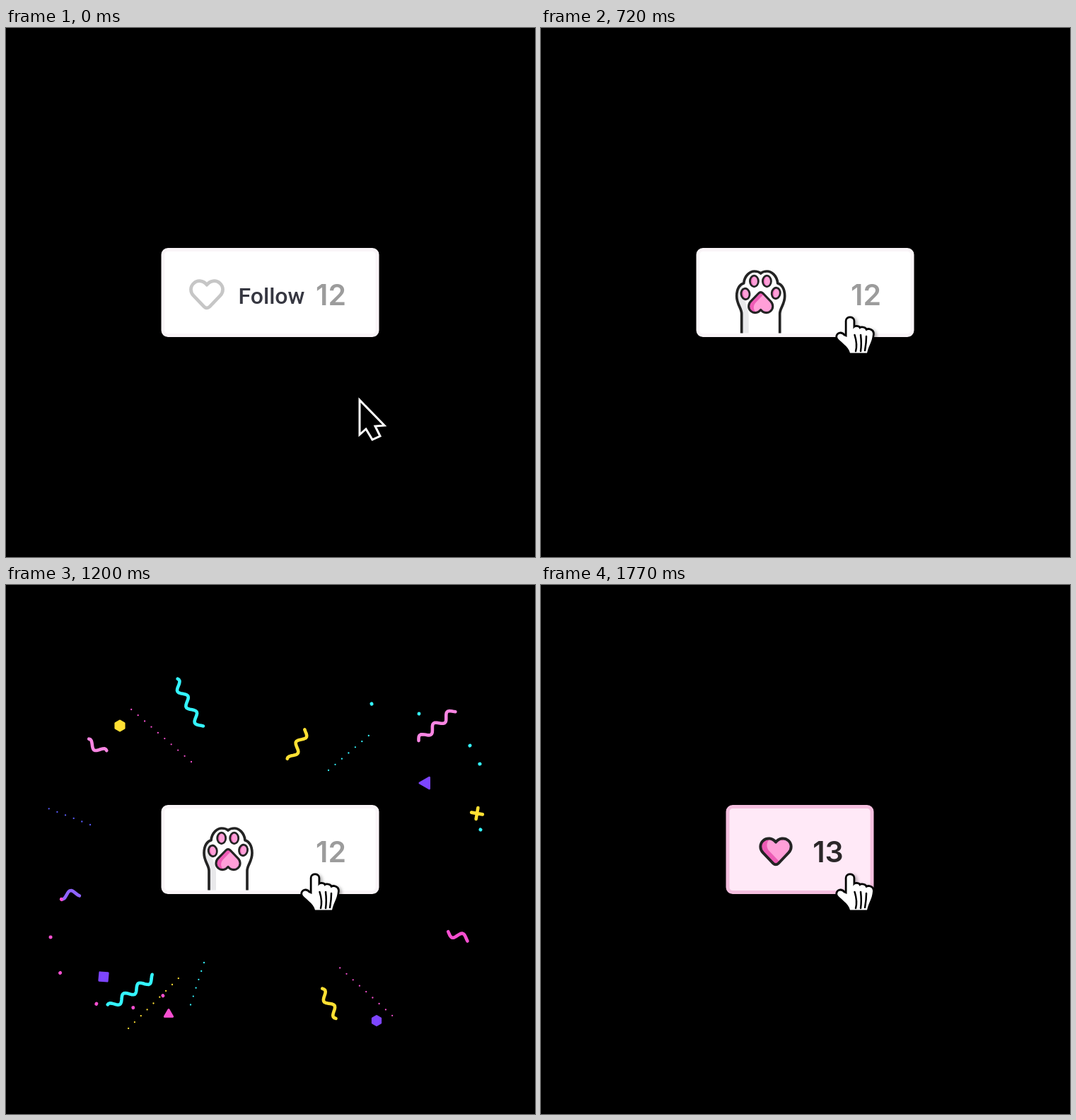
An HTML page that plays this animation: 748x748 px, repeating every 3.57 s.

```html
<!DOCTYPE html>
<html lang="en">
<head>
<meta charset="utf-8">
<title>Follow button</title>
<style>
  html, body { margin: 0; width: 100%; height: 100%; overflow: hidden; background: #000; }
  svg { display: block; width: 100vw; height: 100vh; }
  path { stroke-linecap: round; stroke-linejoin: round; }
  .num { font: 600 41px Inter, Roboto, sans-serif; text-anchor: middle; }
  .label { font: 500 32px Roboto, sans-serif; fill: #363741; }
  .ink { fill: none; stroke: #242424; stroke-width: 3.7; }
  .hand { filter: drop-shadow(3px 2px 2px rgba(0, 0, 0, .3)); }
</style>
</head>
<body>
<svg viewBox="0 0 748 748">
  <defs>
    <path id="heart" d="M0-6.4C-2-9.3-6-9.8-8.5-7.6C-11.2-5.2-11-1.6-8.7 .8L-1.8 8C-.7 9.1 .7 9.1 1.8 8L8.7 .8C11-1.6 11.2-5.2 8.5-7.6C6-9.8 2-9.3 0-6.4Z"/>
    <path id="arm" d="M-27 100V62C-27 54-34 49-34 37C-34 26-29 20-24 19C-23 8-15 2-9 2C-5 2-2 3 0 5C2 3 5 2 9 2C15 2 23 8 24 19C29 20 34 26 34 37C34 49 27 54 27 62V100"/>
    <clipPath id="heartClip"><use href="#heart"/></clipPath>
    <clipPath id="armClip"><use href="#arm"/></clipPath>
    <clipPath id="padClip"><ellipse rx="6" ry="7.8"/></clipPath>
    <clipPath id="inner"><rect x="220" y="311" width="308" height="120.5"/></clipPath>
    <g id="pinkHeart">
      <use href="#heart" fill="#ee5cb6"/>
      <g clip-path="url(#heartClip)"><use href="#heart" x="4.4" y="-1" fill="#ff9fd8"/></g>
      <use href="#heart" fill="none" stroke="#242424" stroke-width="1.9"/>
    </g>
    <g id="pad">
      <ellipse rx="6" ry="7.8" fill="#ee6cba"/>
      <g clip-path="url(#padClip)"><ellipse cx="3" rx="6" ry="8.5" fill="#ff9fd8"/></g>
      <ellipse rx="6" ry="7.8" fill="none" stroke="#242424" stroke-width="2.8"/>
    </g>
  </defs>

  <g id="confetti" fill="none"></g>

  <rect id="button" y="313.5" height="121" rx="7" stroke-width="5"/>
  <text id="label" class="label" x="328.5" y="390">Follow</text>
  <use id="outline" href="#heart" fill="none" stroke="#c6c6c6" stroke-width="2.2"/>
  <text id="before" class="num" y="392" fill="#9c9c9c">12</text>
  <text id="after" class="num" y="391.5" fill="#2b2729">13</text>

  <g clip-path="url(#inner)">
    <g id="white">
      <use href="#arm" fill="#fff"/>
      <path d="M-27 100H-17V64C-17 54-24 46-26 20H-40V100Z" fill="#e9e9eb" clip-path="url(#armClip)"/>
      <use href="#arm" class="ink"/>
      <use href="#pad" transform="translate(-21.7 34) rotate(-8)"/>
      <use href="#pad" transform="translate(-9.3 16)"/>
      <use href="#pad" transform="translate(8.7 16)"/>
      <use href="#pad" transform="translate(21.5 33) rotate(8)"/>
      <use href="#pinkHeart" transform="translate(0 46) scale(1.63 -1.63)"/>
    </g>
    <g id="yellow">
      <use href="#arm" fill="#ffeea4"/>
      <path d="M-40 100H-17V64C-17 48-24 34-10 0H-40Z" fill="#ffd45e" clip-path="url(#armClip)"/>
      <use href="#arm" class="ink"/>
      <path class="ink" d="M-24 19l4 5M0 5v5M24 19l-4 5" style="stroke-width:3"/>
    </g>
    <g id="impact" fill="none">
      <circle id="ring" cx="341" cy="377" stroke="#ee4fcb"/>
      <path id="ticks" stroke="#000" stroke-width="4.5" style="stroke-linecap:butt"/>
    </g>
  </g>
  <use id="liked" href="#pinkHeart"/>

  <path id="arrow" d="M0 0V49L9 41L18 56L29 51L22 37L35 36Z" fill="#000" stroke="#fff" stroke-width="3" style="stroke-linejoin:miter"/>
  <g id="hand" class="hand">
    <path d="M432.5 437V414C432.5 409 441.5 409 441.5 414V426C443 421.5 450 422 450.5 426C452 423 459 424 459.5 428.5C462 425.5 469.5 427 469 433C468 445 464 447 461 459.5H437C435 450 422 443 419.5 438.5C417.5 433 424 430 428 435Z" fill="#fff" stroke="#000" stroke-width="5.5" paint-order="stroke"/>
    <path d="M443.5 434C446 442 447 450 445 457M452 434C453 442 453 450 452 457M460 436C460 445 459 450 458 456" fill="none" stroke="#000" stroke-width="2.5"/>
  </g>
</svg>
<script>
const LOOP = 3570, STEP = 30, END = 1770;
const CYAN = '#34f5ff', YELLOW = '#ffe033', PINK = '#f985e2', MAGENTA = '#f64fd0', PURPLE = '#7d45ff', BLUE = '#5a5cff';

const $ = id => document.getElementById(id);
const clamp = x => Math.max(0, Math.min(1, x));
const span = (t, a, b) => clamp((t - a) / (b - a));
const smooth = x => x * x * (3 - 2 * x);
const lerp = (a, b, p) => a + (b - a) * p;
const mix = (a, b, p) => `rgb(${a.map((v, i) => Math.round(lerp(v, b[i], p)))})`;
const put = (el, attrs) => { for (const k in attrs) el.setAttribute(k, attrs[k]); };
const place = (id, x, y, s = 1) => put($(id), { transform: `translate(${x} ${y}) scale(${s})` });
const show = (id, v) => put($(id), { opacity: v });

// Piecewise linear track: [[time, value], ...]
function track(keys, t) {
  if (t <= keys[0][0]) return keys[0][1];
  for (let i = 1; i < keys.length; i++) {
    const [t0, v0] = keys[i - 1], [t1, v1] = keys[i];
    if (t <= t1) return lerp(v0, v1, (t - t0) / (t1 - t0));
  }
  return keys[keys.length - 1][1];
}

function addPath(attrs) {
  const el = document.createElementNS('http://www.w3.org/2000/svg', 'path');
  put(el, attrs);
  $('confetti').append(el);
  return el;
}

// x0, y0, x1, y1, delay, colour, phase in turns
const waves = [
  [300, 245, 211, 83, 0, CYAN, .42],
  [252, 525, 98, 630, 0, CYAN, .3],
  [386, 278, 442, 172, 0, YELLOW, .36],
  [428, 545, 488, 642, 0, YELLOW, .34],
  [553, 246, 688, 131, 30, PINK, .93],
  [152, 245, 70, 193, 80, PINK, .6],
  [107, 434, 2, 454, 150, '#8f63ff', .65],
  [619, 490, 734, 524, 135, MAGENTA, .71]
];
const dots = [
  [262, 250, 144, 147, 0, MAGENTA],
  [119, 339, 29, 304, 0, BLUE],
  [288, 512, 155, 645, -70, YELLOW],
  [280, 534, 242, 653, 50, CYAN],
  [463, 533, 577, 637, -20, MAGENTA],
  [456, 262, 587, 149, 75, CYAN]
];
const waveHead = [[960, 0], [1050, .27], [1200, .69], [1410, 1]];
const waveTail = [[1050, .02], [1200, .27], [1410, .91], [1445, 1]];
const dotHead = [[1010, 0], [1050, .16], [1200, .77], [1380, 1.02]];
const dotTail = [[1200, -.01], [1410, .83], [1500, 1.02]];

const trails = [
  ...waves.map(w => ({ w, step: 2, amp: 5, width: 4.6, head: waveHead, tail: waveTail })),
  ...dots.map(w => ({ w, step: 12.5, amp: 0, width: 2.3, head: dotHead, tail: dotTail }))
].map(o => ({ ...o, el: addPath({ stroke: o.w[5], 'stroke-width': o.width }) }));

function drawTrail({ w, step, amp, head, tail, el }, t) {
  const [x0, y0, x1, y1, delay, , phase = 0] = w;
  const len = Math.hypot(x1 - x0, y1 - y0), ux = (x1 - x0) / len, uy = (y1 - y0) / len;
  const a = track(tail, t - delay) * len, b = track(head, t - delay) * len;
  let d = '';
  if (b > 0 && a < len) {
    for (let s = Math.max(0, Math.ceil(a / step) * step); s <= b; s += step) {
      const k = amp * Math.sin((s / 25.5 + phase) * 2 * Math.PI);
      const p = `${(x0 + ux * s - uy * k).toFixed(1)} ${(y0 + uy * s + ux * k).toFixed(1)}`;
      d += amp ? (d ? 'L' : 'M') + p : `M${p}h.01`;
    }
  }
  put(el, { d });
}

// Two bursts of rays that end as dots
const rays = [
  ...[212, 180, 150, 111, 81, 55].map(deg => ({ cx: 164, cy: 498, r: 101, deg, color: MAGENTA })),
  ...[[517, 168], [584, 182], [656, 227], [670, 253], [671, 346]].map(([x, y]) => ({
    cx: 570, cy: 285, r: Math.hypot(x - 570, y - 285),
    deg: Math.atan2(y - 285, x - 570) * 180 / Math.PI, color: CYAN
  }))
].map(o => ({ ...o, el: addPath({ stroke: o.color, 'stroke-width': 4.8 }) }));

function drawRay({ cx, cy, r, deg, el }, t) {
  const p = span(t, 950, 1205), a = deg * Math.PI / 180;
  const mid = r - 101 * (1 - p) ** 2;
  const half = track([[960, 0], [1020, 8], [1050, 8.5], [1195, .2]], t);
  const at = q => `${cx + Math.cos(a) * q} ${cy + Math.sin(a) * q}`;
  const on = t >= 960 && t < 1230;
  put(el, { d: on ? `M${at(Math.max(0, mid - half))}L${at(mid + half)}` : '' });
}

// x0, y0, x1, y1, radius, sides (0 = plus), angle, spin, start, colour
const bits = [
  [161, 199, 120, 159, 7, 6, 30, 20, 1080, YELLOW],
  [594, 280, 641, 250, 9, 3, 180, 90, 1080, PURPLE],
  [666, 323, 713, 306, 8, 0, 10, 35, 1080, YELLOW],
  [138, 554, 83, 585, 8, 4, 50, 25, 1080, PURPLE],
  [230, 607, 215, 632, 6.5, 3, -90, -90, 1000, MAGENTA],
  [524, 616, 558, 643, 6.5, 6, 30, 25, 1080, PURPLE]
].map(b => ({ b, el: addPath({ stroke: b[9], fill: b[5] ? b[9] : 'none' }) }));

function drawBit({ b, el }, t) {
  const [x0, y0, x1, y1, r, sides, angle, spin, start] = b;
  const q = track([[900, -3], [1050, -1.7], [1200, 0], [1410, 1], [1530, 1.4]], t);
  const s = r * track([[start, 0], [start + 45, 1], [1200, 1], [1410, .65], [1530, 0]], t);
  const n = sides || 4, pts = [];
  for (let i = 0; i < n; i++) {
    const a = (angle + spin * q) * Math.PI / 180 + i * 2 * Math.PI / n;
    pts.push(`${lerp(x0, x1, q) + s * Math.cos(a)} ${lerp(y0, y1, q) + s * Math.sin(a)}`);
  }
  const d = sides ? `M${pts.join('L')}Z` : `M${pts[0]}L${pts[2]}M${pts[1]}L${pts[3]}`;
  put(el, { d: s > 0 ? d : '', 'stroke-width': s / r * (sides ? 3 : 4.6) });
}

function drawButton(t) {
  const p = smooth(span(t, 1320, 1530));
  const left = lerp(219.5, 261.5, p), right = lerp(527.5, 470.5, p);
  put($('button'), {
    x: left + 2.5, width: right - left - 5,
    fill: mix([255, 255, 255], [255, 233, 247], p),
    stroke: mix([250, 245, 248], [245, 191, 223], p)
  });
  put($('before'), { x: lerp(459.5, 406, p), opacity: 1 - p });
  put($('after'), { x: lerp(459.5, 406, p), opacity: clamp(p * 1.2) });

  show('label', 1 - span(t, 390, 500));
  const m = smooth(span(t, 390, 510));
  place('outline', lerp(284, 311.5, m), lerp(377, 388, m), lerp(2.15, 1.63, m));
  show('outline', 1 - span(t, 430, 540));
  place('liked', lerp(314.5, 332, p), lerp(388, 377, p), lerp(1.63, 2.07, p));
  show('liked', p);

  const dx = track([[510, 0], [900, -1.5], [975, 8], [1050, 8], [1170, 2.5]], t);
  place('white', 311.5 + dx + 17.5 * p, 342);
  show('white', span(t, 430, 600) * (1 - p));
}

function drawHit(t) {
  place('yellow',
    track([[810, 370], [900, 360], [965, 346], [1050, 347.5], [1170, 370]], t),
    track([[820, 436], [900, 375], [965, 354], [1050, 356], [1150, 440]], t));
  const on = t >= 975 && t < 1140;
  show('impact', on ? 1 : 0);
  if (!on) return;
  put($('ring'), {
    r: track([[960, 10], [1050, 54], [1140, 68]], t),
    'stroke-width': track([[1050, 3], [1140, 0]], t)
  });
  const r = track([[960, 40], [1050, 61], [1140, 76]], t);
  const len = track([[960, 2], [1050, 9], [1140, 0]], t);
  let d = '';
  for (const deg of [-130, -90, -50]) {
    const a = deg * Math.PI / 180, o = deg === -90 ? -3 : 2;
    const at = q => `${340.5 + Math.cos(a) * q} ${377 + Math.sin(a) * q}`;
    d += `M${at(r + o)}L${at(r + o + len)}`;
  }
  put($('ticks'), { d });
}

function drawCursor(t) {
  const m = smooth(span(t, 250, 480));
  const x = lerp(500, 437, m), y = lerp(526, 410, m);
  const over = y < 437;
  place('arrow', x, y);
  place('hand', x - 437, y - 410);
  show('arrow', over ? 0 : 1);
  show('hand', over ? 1 : 0);
}

function render(ms) {
  const t = Math.min(END, Math.floor(ms / STEP) * STEP);
  drawButton(t);
  drawHit(t);
  // The pointer rests until 270 ms
  drawCursor(t < 270 ? 0 : t);
  trails.forEach(o => drawTrail(o, t));
  rays.forEach(o => drawRay(o, t));
  bits.forEach(o => drawBit(o, t));
}

const begin = performance.now();
function tick() {
  render((performance.now() - begin) % LOOP);
  requestAnimationFrame(tick);
}
tick();
</script>
</body>
</html>
```
